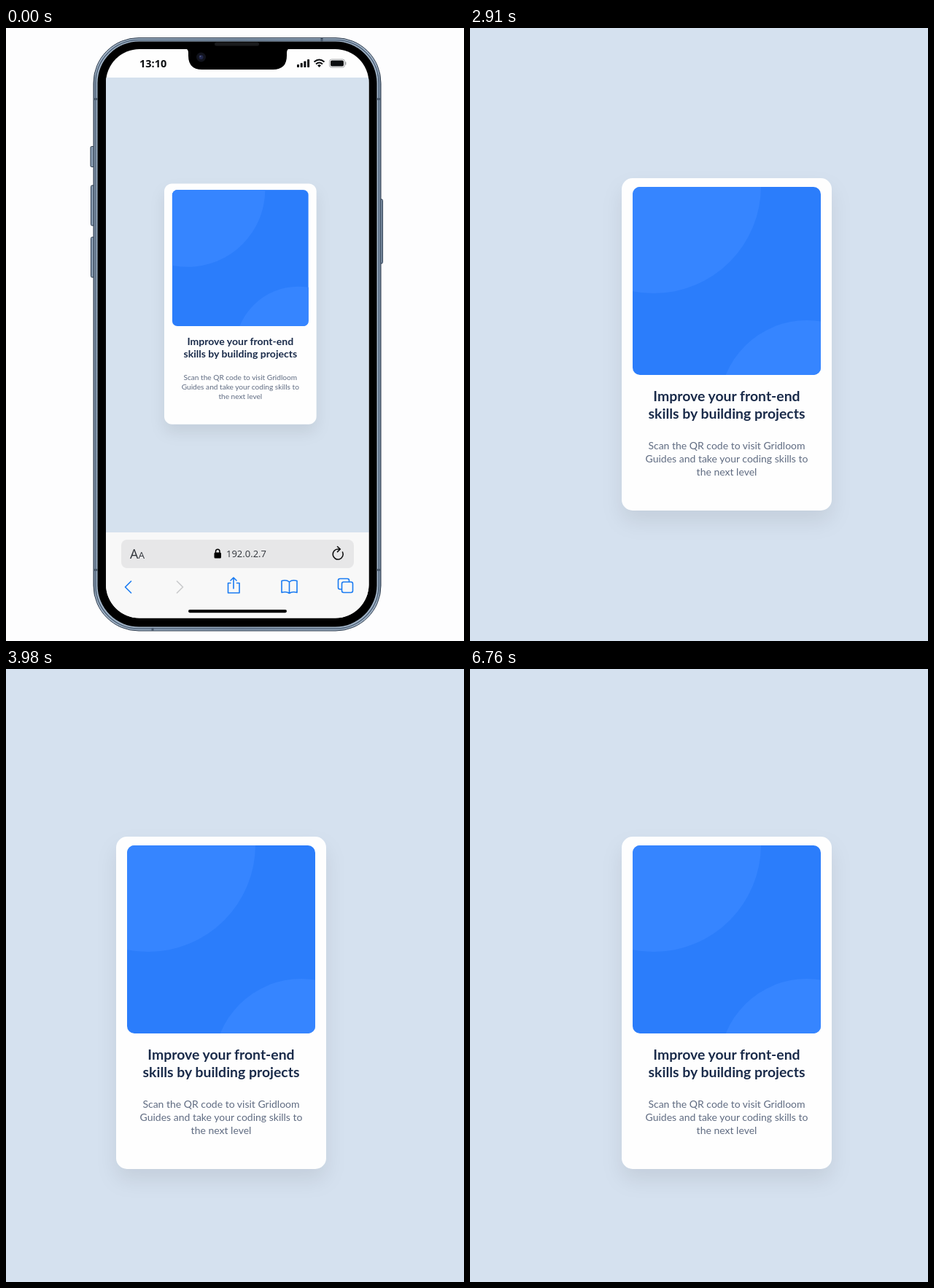
An HTML page for the animation above (7.3 s loop, 628 px wide and 841 px high).

```html
<!DOCTYPE html>
<html lang="en">
<head>
<meta charset="utf-8">
<title>Card preview</title>
<style>
  html, body { margin: 0; width: 100%; height: 100%; overflow: hidden; background: #fdfdfe; }
  svg { display: block; width: 628px; height: 841px; }

  .title { font: 700 19.4px Lato, sans-serif; fill: #1a2b4a; text-anchor: middle; }
  .note { font: 400 14px Lato, sans-serif; fill: #606c82; text-anchor: middle; }
  .sheet { fill: #fefefe; filter: drop-shadow(0 15px 14px rgba(0, 0, 0, .078)); }
  .clock { font: 700 14.5px "Open Sans", sans-serif; fill: #0b0d10; }
  .address { font: 400 13px "Open Sans", sans-serif; fill: #30343a; }
  .size { font-family: "Open Sans", sans-serif; fill: #30343a; }
  .icon { fill: none; stroke: #1a7bf2; stroke-width: 1.6; stroke-linecap: round; stroke-linejoin: round; }

  #desktop, #scroll, #touch, #arrow { animation: 7300ms step-end infinite; }
  #desktop { animation-name: open; }
  #scroll { animation-name: scroll; }
  #touch { animation-name: touch; }
  #arrow { animation-name: arrow; }

  @keyframes open {
    0% { visibility: hidden; }
    12.74%, 100% { visibility: visible; }
  }
  @keyframes scroll {
    0% { transform: translate(0, 0); }
    39.863% { transform: translate(0, -24px); }
    40.822% { transform: translate(0, -62px); }
    41.781% { transform: translate(0, -95px); }
    45.342% { transform: translate(0, -72px); }
    46.233% { transform: translate(0, -26px); }
    47.123% { transform: translate(0, 0); }
    54.521% { transform: translate(-57px, 0); }
    59.863% { transform: translate(-22px, 0); }
    60.822%, 100% { transform: translate(0, 0); }
  }
  @keyframes touch {
    0% { transform: translate(-99px, -99px); }
    .959% { transform: translate(557px, 211px); animation-timing-function: steps(4); }
    4.521% { transform: translate(423.5px, 368.5px); }
    9.178%, 100% { transform: translate(-99px, -99px); }
  }
  @keyframes arrow {
    0% { transform: translate(-99px, -99px); }
    80.822% { transform: translate(559px, 544px); animation-timing-function: steps(4); }
    84.384% { transform: translate(450px, 791px); }
    88.082% { transform: translate(457px, 799px); animation-timing-function: steps(5); }
    92.603%, 100% { transform: translate(-99px, 842px); }
  }
</style>
</head>
<body>
<svg viewBox="0 0 628 841">
  <defs>
    <clipPath id="cover"><rect x="15" y="12" width="258" height="258" rx="10"/></clipPath>
    <clipPath id="screen"><rect x="137" y="29" width="360.5" height="780.5" rx="46"/></clipPath>
    <linearGradient id="steel">
      <stop offset="0" stop-color="#5b6e84"/>
      <stop offset=".008" stop-color="#a3b5c8"/>
      <stop offset=".5" stop-color="#8c9fb4"/>
      <stop offset=".992" stop-color="#a3b5c8"/>
      <stop offset="1" stop-color="#5b6e84"/>
    </linearGradient>
    <g id="card">
      <rect class="sheet" width="288" height="456" rx="15"/>
      <g clip-path="url(#cover)">
        <rect x="15" y="12" width="258" height="258" fill="#2b7dfb"/>
        <g fill="#3685ff">
          <circle cx="44" cy="11" r="147"/>
          <circle cx="254" cy="315" r="120"/>
        </g>
      </g>
      <text class="title"><tspan x="144" y="306">Improve your front-end</tspan><tspan x="144" y="330">skills by building projects</tspan></text>
      <text class="note"><tspan x="144" y="372">Scan the QR code to visit Gridloom</tspan><tspan x="144" y="390">Guides and take your coding skills to</tspan><tspan x="144" y="408">the next level</tspan></text>
    </g>
  </defs>

  <rect width="628" height="841" fill="#fdfdfe"/>

  <g id="phone">
    <!-- side buttons -->
    <g fill="#8c9fb4" stroke="#27364a">
      <rect x="116" y="162.5" width="5" height="28" rx="1.5"/>
      <rect x="116.5" y="216" width="5" height="55" rx="1.5"/>
      <rect x="116.5" y="287" width="5" height="55" rx="1.5"/>
      <rect x="512" y="235" width="4.5" height="88" rx="1.5"/>
    </g>
    <!-- body -->
    <rect x="120" y="13.5" width="394" height="813.5" rx="62" fill="url(#steel)" stroke="#2c3a4c"/>
    <rect x="123" y="16.5" width="388" height="807.5" rx="59" fill="none" stroke="#506379" stroke-width="1.5"/>
    <rect x="125.5" y="18.5" width="383" height="803" rx="57" fill="#000"/>
    <path d="M120 97.5h5M120 743.5h5M509 97.5h5M509 743.5h5M433 14v4M201 823v4" stroke="#4a5a6d" stroke-width="3"/>

    <g clip-path="url(#screen)">
      <rect x="137" y="29" width="361" height="781" fill="#fefefe"/>
      <rect x="137" y="68" width="361" height="624" fill="#d5e1ee"/>
      <rect x="137" y="692" width="361" height="118" fill="#f8f8f8"/>
      <use href="#card" transform="translate(217 213.4) scale(.7245)"/>
    </g>

    <!-- notch -->
    <path d="M246 28h143q-4 1-4 6v4q0 19-19 19h-97q-19 0-19-19v-4q0-5-4-6z"/>
    <rect x="286" y="19.5" width="61" height="5" rx="2.5" fill="#1a1b1d"/>
    <circle cx="267.5" cy="40" r="6.5" fill="#11131c"/>
    <circle cx="267.5" cy="40" r="3" fill="#20264a"/>
    <circle cx="266.5" cy="39" r="1" fill="#555d80"/>

    <!-- status bar -->
    <text class="clock" x="183" y="54">13:10</text>
    <g fill="#0b0d10">
      <rect x="399" y="50" width="3" height="4" rx=".8"/>
      <rect x="403.7" y="48" width="3" height="6" rx=".8"/>
      <rect x="408.4" y="45.5" width="3" height="8.5" rx=".8"/>
      <rect x="413.1" y="43" width="3" height="11" rx=".8"/>
      <path d="M427 51.3q2.5-2 5 0l-2.5 2.7z"/>
    </g>
    <path d="M422.5 46.5q7-6 14 0M425 49.4q4.5-3.8 9 0" fill="none" stroke="#0b0d10" stroke-width="2"/>
    <rect x="443.5" y="43" width="21" height="11" rx="3" fill="none" stroke="#a5a7a9"/>
    <rect x="445" y="44.5" width="18" height="8" rx="1.8" fill="#0b0d10"/>
    <path d="M465.8 46.5v4" stroke="#a5a7a9" stroke-width="1.3"/>

    <!-- address bar -->
    <rect x="158" y="702" width="319" height="39" rx="8" fill="#e7e7e8"/>
    <text class="size" x="170" y="728" font-size="18">A<tspan font-size="13.5">A</tspan></text>
    <rect x="285.5" y="719.5" width="9.5" height="8" rx="1.5"/>
    <path d="M287.5 720v-2a2.75 2.75 0 0 1 5.5 0v2" fill="none" stroke="#000" stroke-width="1.5"/>
    <text class="address" x="302" y="726">192.0.2.7</text>
    <path d="M461.5 719a7 7 0 1 1-6.5-4h3M454.5 711.5l3.7 3.5-3.7 3.6" fill="none" stroke="#111" stroke-width="1.6" stroke-linecap="round"/>

    <!-- toolbar -->
    <g class="icon">
      <path d="M171.5 759l-8 8 8 8"/>
      <path d="M234.5 759l8 8-8 8" stroke="#c9cacc"/>
      <path d="M308 761.5h-3.5v13.5h15.5v-13.5h-3.5M312 769v-14.5M308 758l4-4 4 4"/>
      <path d="M388.5 760q-4-3.5-10.5-1.5v16q6.5-2 10.5 1 4-3 10.5-1v-16q-6.5-2-10.5 1.5zv15.5"/>
      <rect x="460.5" y="760" width="15" height="14.5" rx="2.5"/>
      <path d="M460 770h-2q-2.5 0-2.5-2.5v-9.5q0-2.5 2.5-2.5h10q2.5 0 2.5 2.5v1.5"/>
    </g>
    <rect x="250" y="798" width="135" height="4.2" rx="2.1"/>
  </g>

  <g id="desktop">
    <rect width="628" height="841" fill="#d5e1ef"/>
    <g id="scroll"><use href="#card" x="208" y="230"/></g>
  </g>

  <circle id="touch" r="21" fill="#333" fill-opacity=".25"/>
  <path id="arrow" d="M.5.5v16l3.7-3.5 2.5 5.8 2.3-1-2.5-5.6h5z" fill="#fff" stroke="#000"/>
</svg>
</body>
</html>
```
